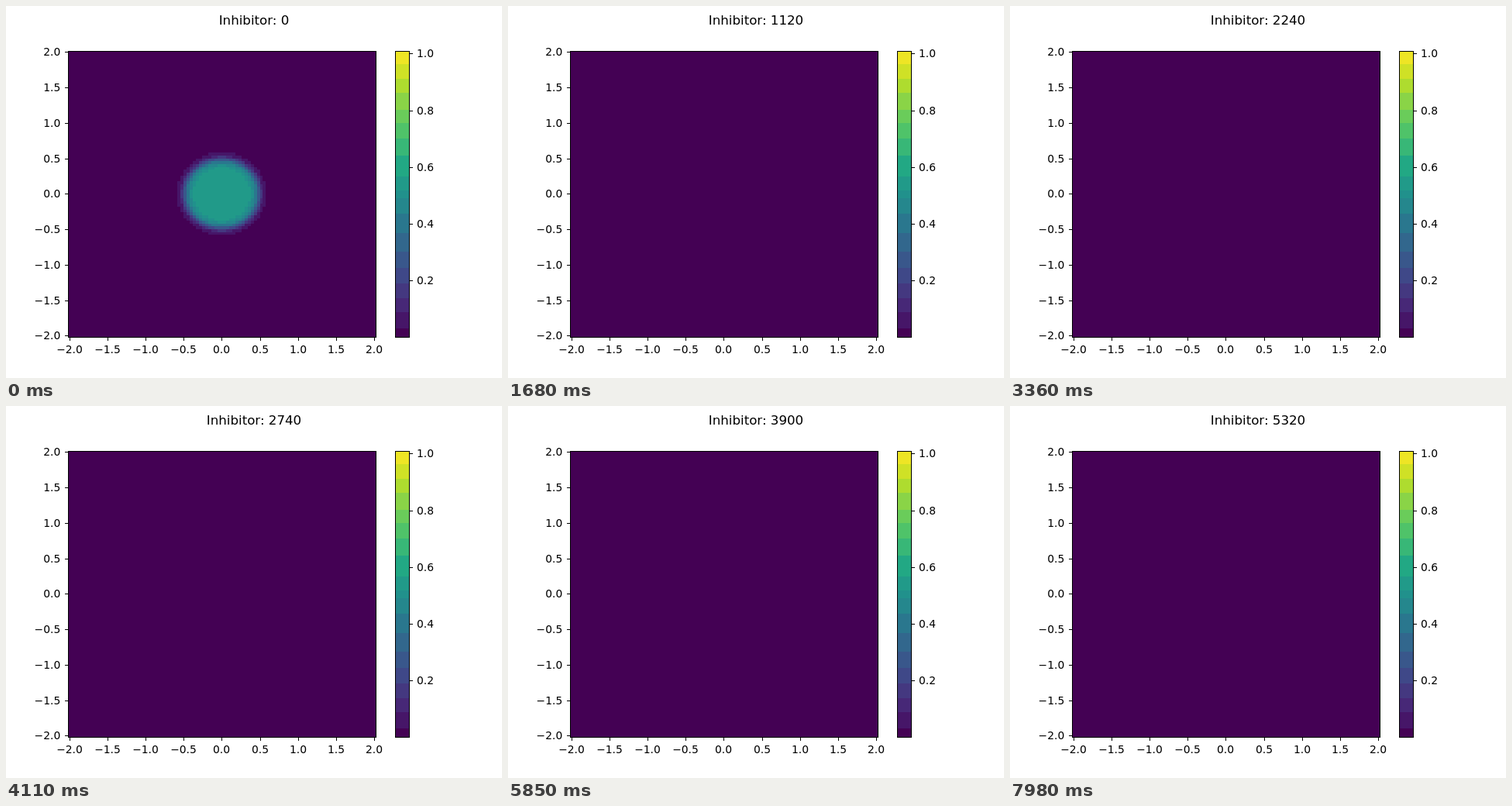
Animation, 640 px wide and 480 px high, one loop 8 s. Source, as an HTML page with a canvas:

```html
<!DOCTYPE html>
<html lang="en">
<head>
<meta charset="utf-8">
<title>Inhibitor</title>
<style>
  html, body { margin: 0; width: 640px; height: 480px; overflow: hidden; background: #fff; }
  canvas, svg { position: absolute; left: 0; top: 0; }
  text { font: 13.89px "DejaVu Sans", sans-serif; fill: #000; }
  #title { font-size: 16.67px; text-anchor: middle; }
</style>
</head>
<body>
<canvas id="plot" width="640" height="480"></canvas>
<svg id="labels" width="640" height="480"><text id="title" x="320" y="24"></text></svg>
<script>
const LOOP = 8000, STEP = 30, COUNT_PER_STEP = 20;
const CELLS = 101, CELL_SIZE = 0.04;
const AXES = { x: 80, y: 57.6, w: 396.8, h: 369.6 };
const VIRIDIS = ['440154', '482475', '414487', '355f8d', '2a788e', '21918c',
                 '22a884', '44bf70', '7ad151', 'bddf26', 'fde725']
  .map(hex => [0, 2, 4].map(i => parseInt(hex.slice(i, i + 2), 16)));
const BAND_TOPS = [416, 395, 377, 358, 338, 317, 293, 268, 248, 238,
                   220, 193, 171, 151, 134, 112, 94, 75, 58];

const ctx = document.getElementById('plot').getContext('2d');
const svg = document.getElementById('labels');
const title = document.getElementById('title');

function viridis(v) {
  const pos = Math.min(Math.max(v, 0), 0.9999) * 10, i = Math.floor(pos);
  const mix = VIRIDIS[i].map((c, k) => Math.round(c + (VIRIDIS[i + 1][k] - c) * (pos - i)));
  return `rgb(${mix})`;
}

const bands = BAND_TOPS.map((top, i) => {
  const bottom = i ? BAND_TOPS[i - 1] : 427;
  const middle = (427.5 - (top + bottom) / 2) / 369.6;
  return { top, bottom, limit: (427.2 - top) / 366, color: viridis(i ? middle : 0) };
});
const bandColor = v => (bands.find(b => v < b.limit) || bands[bands.length - 1]).color;

function box(x, y, w, h, color) {
  ctx.fillStyle = color;
  ctx.fillRect(x, y, w, h);
}

function frame(x, y, w, h) {
  ctx.strokeStyle = '#000';
  ctx.lineWidth = 1;
  ctx.strokeRect(x + 0.5, y + 0.5, w, h);
}

function label(str, x, y, anchor) {
  const node = document.createElementNS(svg.namespaceURI, 'text');
  node.setAttribute('x', x);
  node.setAttribute('y', y);
  node.setAttribute('text-anchor', anchor);
  node.textContent = str.replace('-', '\u2212');
  svg.append(node);
}

function drawScales() {
  for (let i = -4; i <= 4; i++) {
    const x = Math.round(278.4 + i * 49.11), y = Math.round(242.4 - i * 45.74);
    const value = (i / 2).toFixed(1);
    box(x, 428, 1, 4, '#000');
    box(76, y, 4, 1, '#000');
    label(value, x, 448, 'middle');
    label(value, 70.3, y + 5, 'end');
  }
  for (const b of bands) box(502, b.top, 18, b.bottom - b.top, b.color);
  frame(502, 58, 18, 369);
  for (let i = 1; i <= 5; i++) {
    const y = Math.round(427.4 - i * 73.2);
    box(521, y, 4, 1, '#000');
    label((i / 5).toFixed(1), 530, y + 5, 'start');
  }
}

// A smooth-edged disc that diffuses outward while it decays.
function concentration(r, step) {
  const radius = 0.485, variance = 0.0036 + 0.0034 * step;
  const peak = 0.54 * Math.exp(-0.15 * step) * (1 - Math.exp(-radius * radius / (2 * variance)));
  return peak / (1 + Math.exp(1.702 * (r - radius) / Math.sqrt(variance)));
}

const edgeX = i => Math.round(AXES.x + AXES.w * i / CELLS);
const edgeY = i => Math.round(AXES.y + AXES.h * i / CELLS);

function drawField(step) {
  box(80, 58, 397, 369, bands[0].color);
  for (let j = 30; j <= 70; j++) {
    for (let i = 30; i <= 70; i++) {
      const v = concentration(Math.hypot(i - 50, j - 50) * CELL_SIZE, step);
      if (v < bands[0].limit) continue;
      box(edgeX(i), edgeY(j), edgeX(i + 1) - edgeX(i), edgeY(j + 1) - edgeY(j), bandColor(v));
    }
  }
  frame(80, 58, 397, 369);
}

let shown = -1;
function render(now) {
  const step = Math.floor((now % LOOP) / STEP);
  if (step !== shown) {
    shown = step;
    title.textContent = `Inhibitor: ${step * COUNT_PER_STEP}`;
    drawField(step);
  }
}

function tick() {
  render(performance.now() - start);
  requestAnimationFrame(tick);
}

drawScales();
const start = performance.now();
tick();
</script>
</body>
</html>
```
